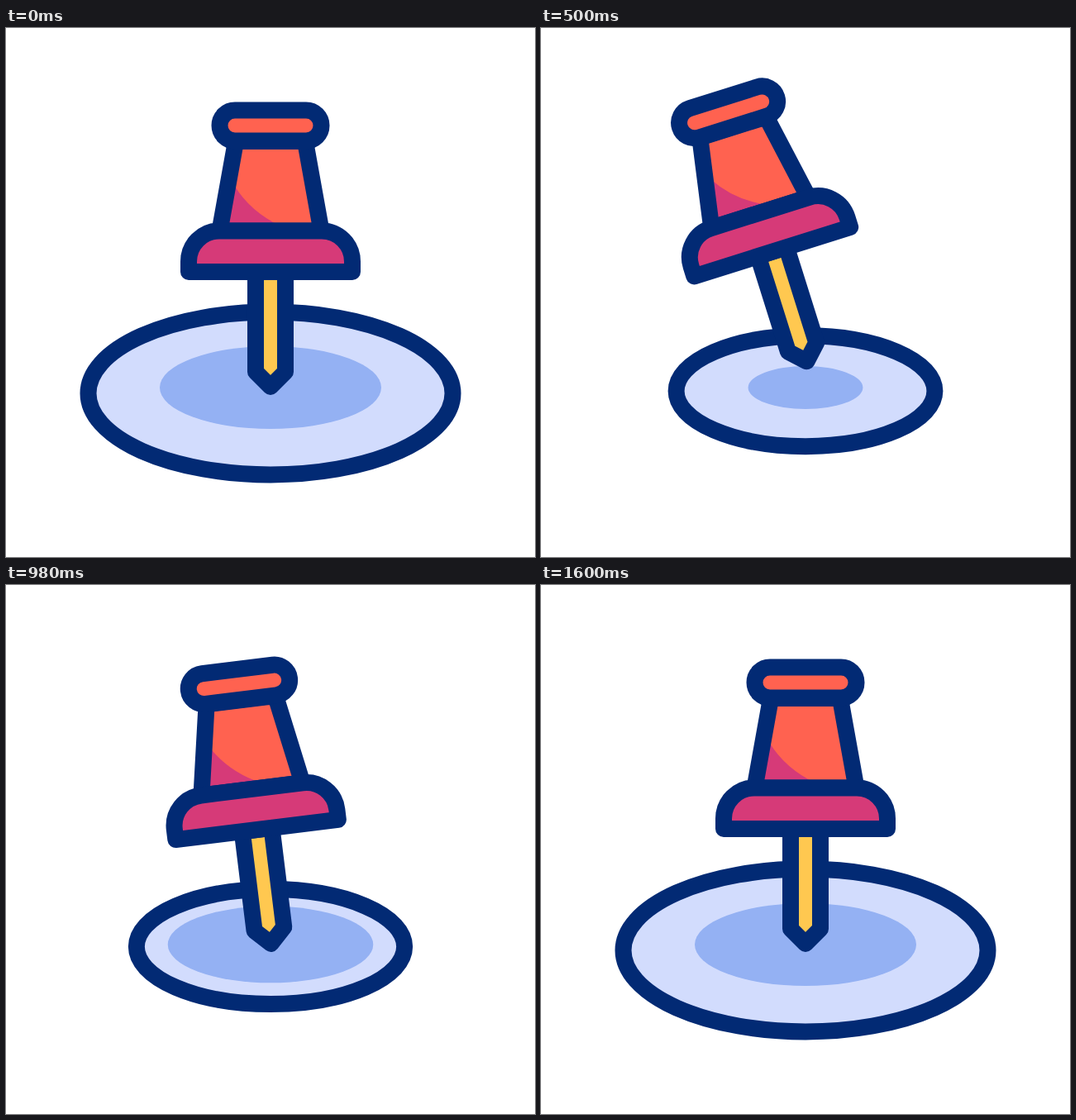
Recreate the animation shown at these times as an HTML page. Size 640 by 640 pixels, loop 3000 ms.

```html
<!DOCTYPE html>
<html lang="en">
<head>
<meta charset="utf-8">
<title>Push pin</title>
<style>
  html, body { margin: 0; height: 100%; overflow: hidden; background: #fff; }
  svg { display: block; width: 100vw; height: 100vh; }
  .line { stroke: #022a74; stroke-width: 20; stroke-linejoin: round; }
  .spark { stroke: #ff6250; stroke-width: 21; stroke-linecap: round; }
</style>
</head>
<body>
<svg viewBox="0 0 640 640">
  <ellipse id="disc" class="line" cx="320" fill="#d2dcfd"/>
  <ellipse id="spot" cx="320" cy="435" fill="#94b1f3"/>
  <line id="left" class="spark"/>
  <line id="right" class="spark"/>
  <!-- the tip of the needle is the origin -->
  <g id="pin">
    <path class="line" fill="#ffc850" d="M-18-139V-18L0 0 18-18V-139Z"/>
    <path fill="#ff6250" d="M-42-297H42L61.5-188.5H-61.5Z"/>
    <path fill="#d63a78" d="M-44-244Q-25-212 13-194V-188.5H-61.5Z"/>
    <path class="line" fill="none" d="M-42-297H42L61.5-188.5H-61.5Z"/>
    <path class="line" fill="#d63a78" d="M-99-139V-151.5A37 37 0 0 1-62-188.5H62A37 37 0 0 1 99-151.5V-139Z"/>
    <rect class="line" fill="#ff6250" x="-61.5" y="-334.5" width="123" height="37" rx="18.5"/>
  </g>
</svg>
<script>
const LOOP = 3000;
const $ = id => document.getElementById(id);
const set = (id, attrs) => {
  for (const k in attrs) $(id).setAttribute(k, attrs[k]);
};
const mix = (a, b, p) => a + (b - a) * p;

// cubic-bezier(x1, 0, x2, 1)
function ease(x, x1 = 1 / 3, x2 = 2 / 3) {
  let lo = 0, hi = 1, s;
  for (let i = 0; i < 24; i++) {
    s = (lo + hi) / 2;
    const q = 1 - s;
    if (3 * x1 * s * q * q + 3 * x2 * s * s * q + s ** 3 < x) lo = s; else hi = s;
  }
  return s * s * (3 - 2 * s);
}

// keys: [time, value or values, x1, x2]; the handles shape the way to that key
function track(keys, t) {
  const i = keys.findIndex(k => k[0] > t);
  if (i === 0) return keys[0][1];
  if (i < 0) return keys[keys.length - 1][1];
  const [t0, a] = keys[i - 1], [t1, b, x1, x2] = keys[i];
  const p = ease((t - t0) / (t1 - t0), x1, x2);
  return Array.isArray(a) ? a.map((v, j) => mix(v, b[j], p)) : mix(a, b, p);
}

const REST = [220.5, 98.4, 442], SMALL = [106, 42.2, 437];
const disc = [[150, REST], [800, SMALL], [875, SMALL], [1120, [246.5, 110.5, 438.5]],
  [1235, [184, 78, 437.5]], [1405, REST]];
const spot = [[80, 1], [800, .23], [1060, 1.125], [1180, .815], [1360, 1]];
const angle = [[0, 0], [800, -25.5], [1120, 5.4], [1235, -3.5], [1370, 1.1], [1520, 0]];
const lift = [[200, 0], [700, 63, .5, .8], [920, 0, .5, .8]];
const head = [[1040, 0], [1240, 1]];
const tail = [[1100, 0], [1400, 1]];

function spark(id, x0, y0, x1, y1, t) {
  const a = track(tail, t), b = track(head, t);
  set(id, {
    x1: mix(x0, x1, a), y1: mix(y0, y1, a),
    x2: mix(x0, x1, b), y2: mix(y0, y1, b),
    visibility: b - a > .001 ? 'visible' : 'hidden'
  });
}

function draw(now) {
  const t = now % LOOP;
  const [rx, ry, cy] = track(disc, t);
  const size = track(spot, t);
  set('disc', { rx, ry, cy });
  set('spot', { rx: 134 * size, ry: 50 * size });
  spark('left', 288, 448, 262, 431, t);
  spark('right', 353, 448, 378.5, 432, t);
  // the pin turns about a point just above its tip
  set('pin', { transform: `translate(320 ${434 - track(lift, t)}) rotate(${track(angle, t)} 0 -5)` });
}

const start = performance.now();
function tick() {
  draw(performance.now() - start);
  requestAnimationFrame(tick);
}
tick();
</script>
</body>
</html>
```
